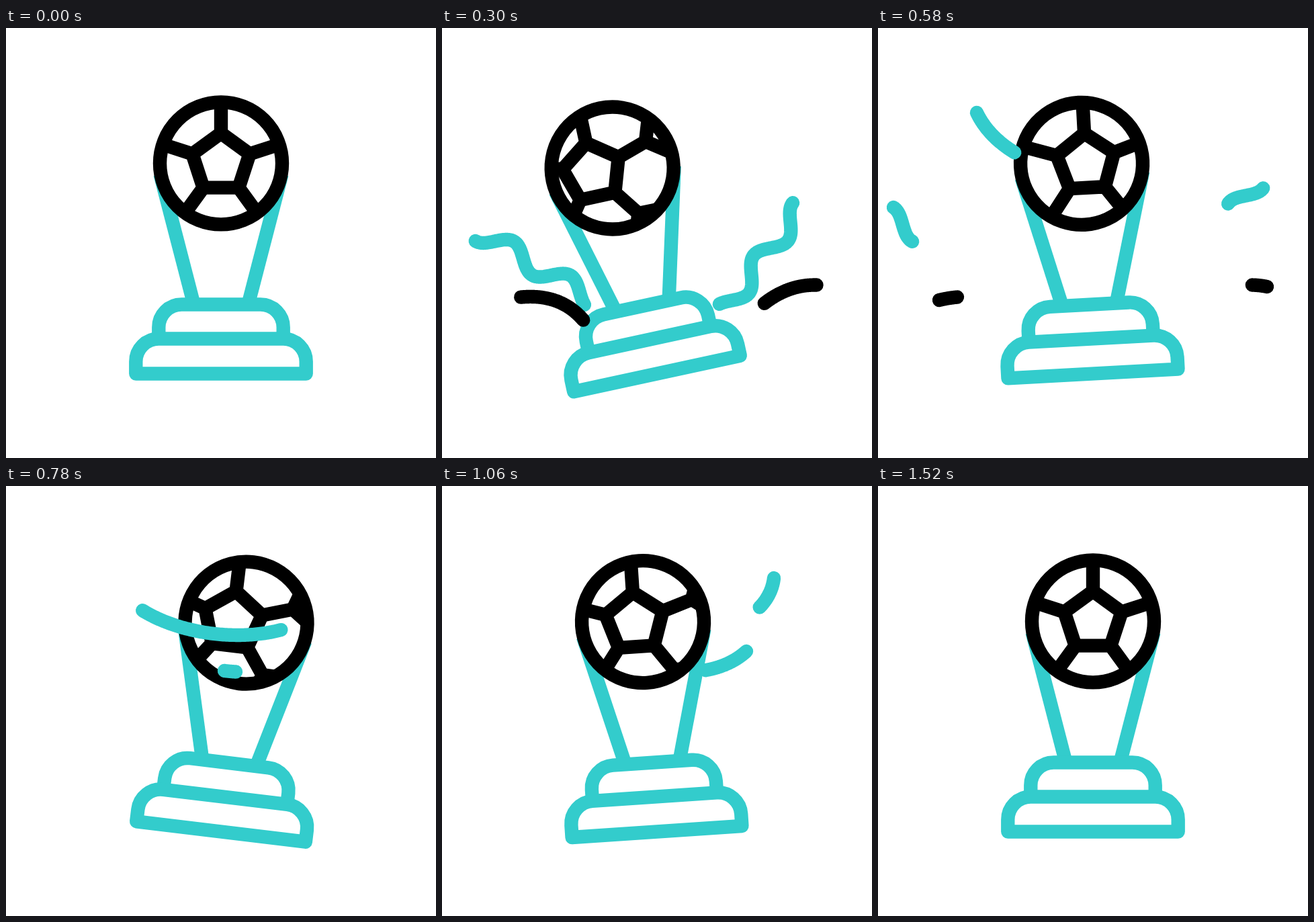
Animation of 640x640 px, one loop 2400 ms. Source, as an HTML page with a canvas:

```html
<!DOCTYPE html>
<html lang="en">
<head>
<meta charset="utf-8">
<title>Football trophy</title>
<style>
  html, body { margin: 0; width: 100%; height: 100%; overflow: hidden; background: #fff; }
  canvas { display: block; width: 100vw; height: 100vh; }
</style>
</head>
<body>
<canvas id="stage" width="640" height="640"></canvas>
<script>
const ctx = document.getElementById('stage').getContext('2d');
const TEAL = '#33cccc', BLACK = '#000';
const LOOP = 2400, STEP = 20, LINE = 20.4;
const PIVOT = { x: 320, y: 514.5 };
const BALL = { x: 320, y: 201.4, r: 91 };

const mix = (a, b, u) => a + (b - a) * u;
const mixPoint = (p, q, u) => [mix(p[0], q[0], u), mix(p[1], q[1], u)];
const polar = (r, angle, [x, y] = [0, 0]) => [x + r * Math.cos(angle), y + r * Math.sin(angle)];

const ease = (t, from, to) => {
  const u = Math.min(1, Math.max(0, (t - from) / (to - from)));
  return u * u * (3 - 2 * u);
};

// Eased value along [time, value] keys.
function track(keys, t) {
  let value = keys[0][1];
  for (let i = 1; i < keys.length; i++) {
    value += (keys[i][1] - keys[i - 1][1]) * ease(t, keys[i - 1][0], keys[i][0]);
  }
  return value;
}

const TILT = [[0, 0], [360, -13.2], [800, 7], [1080, -4], [1520, 0]];
const ROLL = [[0, 0], [420, -38], [600, 8], [780, -20.5], [1420, 0]];

// Each path maps u in 0..1 to a point.
const bezier = (...points) => u => {
  let level = points;
  while (level.length > 1) {
    level = level.slice(1).map((p, i) => mixPoint(level[i], p, u));
  }
  return level[0];
};

// Two and a half cosine periods along a straight axis.
const wave = (from, to, amplitude) => {
  const normal = Math.atan2(to[1] - from[1], to[0] - from[0]) + Math.PI / 2;
  return u => polar(amplitude * Math.cos(5 * Math.PI * u), normal, mixPoint(from, to, u));
};

function ribbon(color, head, tail, path) {
  const samples = [];
  let length = 0;
  for (let i = 0; i <= 200; i++) {
    const point = path(i / 200);
    if (i) {
      const last = samples[i - 1].point;
      length += Math.hypot(point[0] - last[0], point[1] - last[1]);
    }
    samples.push({ point, at: length });
  }
  return { color, head, tail, samples, length };
}

const BURST = [[0, 420], [250, 715]];
const ribbons = [
  ribbon(TEAL, ...BURST, wave([226, 406], [15.5, 279.5], -14.5)),
  ribbon(TEAL, ...BURST, wave([417, 425], [562, 230], -14)),
  ribbon(BLACK, ...BURST, bezier([213, 438], [172, 386], [91, 405])),
  ribbon(BLACK, ...BURST, bezier([477, 412], [524, 374], [579, 385])),
  ribbon(TEAL, [420, 980], [620, 1180], bezier([147, 126], [206, 250], [480, 254], [494, 137])),
  ribbon(TEAL, [700, 1060], [860, 1260], bezier([325, 275], [410, 285], [453, 246]))
];

function pointAt({ samples }, at) {
  const i = Math.max(1, samples.findIndex(s => s.at >= at - 1e-6));
  const a = samples[i - 1], b = samples[i];
  return mixPoint(a.point, b.point, (at - a.at) / (b.at - a.at));
}

function drawRibbon(item, t) {
  const from = ease(t, ...item.tail) * item.length;
  const to = ease(t, ...item.head) * item.length;
  if (to <= from) return;
  const inner = item.samples.filter(s => s.at > from && s.at < to).map(s => s.point);
  ctx.strokeStyle = item.color;
  ctx.lineCap = 'round';
  ctx.beginPath();
  [pointAt(item, from), ...inner, pointAt(item, to)].forEach(p => ctx.lineTo(...p));
  ctx.stroke();
}

function tier(halfWidth, top, bottom, closed) {
  const left = PIVOT.x - halfWidth, right = PIVOT.x + halfWidth;
  ctx.beginPath();
  ctx.moveTo(left, bottom);
  ctx.arcTo(left, top, PIVOT.x, top, 34);
  ctx.arcTo(right, top, right, bottom, 34);
  ctx.lineTo(right, bottom);
  if (closed) ctx.closePath();
  ctx.stroke();
}

function drawStand() {
  ctx.strokeStyle = TEAL;
  ctx.lineCap = 'butt';
  for (const side of [-1, 1]) {
    ctx.beginPath();
    ctx.moveTo(PIVOT.x + side * 90.5, 218);
    ctx.lineTo(PIVOT.x + side * 40.5, 411);
    ctx.stroke();
  }
  tier(92.7, 411.5, 462.5, false);
  tier(126.7, 462.5, 514.5, true);
}

function drawBall(roll) {
  ctx.save();
  ctx.translate(BALL.x, BALL.y);
  ctx.strokeStyle = BLACK;
  ctx.lineCap = 'butt';

  ctx.save();
  ctx.beginPath();
  ctx.arc(0, 0, BALL.r, 0, 2 * Math.PI);
  ctx.clip();
  ctx.translate(roll, 0);
  const spokes = [0, 1, 2, 3, 4].map(i => -Math.PI / 2 + i * 2 * Math.PI / 5);
  ctx.beginPath();
  spokes.forEach(a => ctx.lineTo(...polar(44.8, a)));
  ctx.closePath();
  for (const a of spokes) {
    const hub = polar(91.5, a);
    ctx.moveTo(...polar(44.8, a));
    ctx.lineTo(...hub);
    ctx.moveTo(...polar(50, a - 0.93, hub));
    ctx.lineTo(...hub);
    ctx.lineTo(...polar(50, a + 0.93, hub));
  }
  ctx.stroke();
  ctx.restore();

  ctx.beginPath();
  ctx.arc(0, 0, BALL.r, 0, 2 * Math.PI);
  ctx.stroke();
  ctx.restore();
}

function draw(t) {
  ctx.fillStyle = '#fff';
  ctx.fillRect(0, 0, 640, 640);
  ctx.lineWidth = LINE;
  ctx.lineJoin = 'round';

  ctx.save();
  ctx.translate(PIVOT.x, PIVOT.y);
  ctx.rotate(track(TILT, t) * Math.PI / 180);
  ctx.translate(-PIVOT.x, -PIVOT.y);
  drawStand();
  drawBall(track(ROLL, t));
  ctx.restore();

  ribbons.forEach(item => drawRibbon(item, t));
}

let start;
function tick(now) {
  start ??= now;
  const t = (now - start) % LOOP;
  draw(Math.floor(t / STEP) * STEP);
  requestAnimationFrame(tick);
}
draw(0);
requestAnimationFrame(tick);
</script>
</body>
</html>
```
